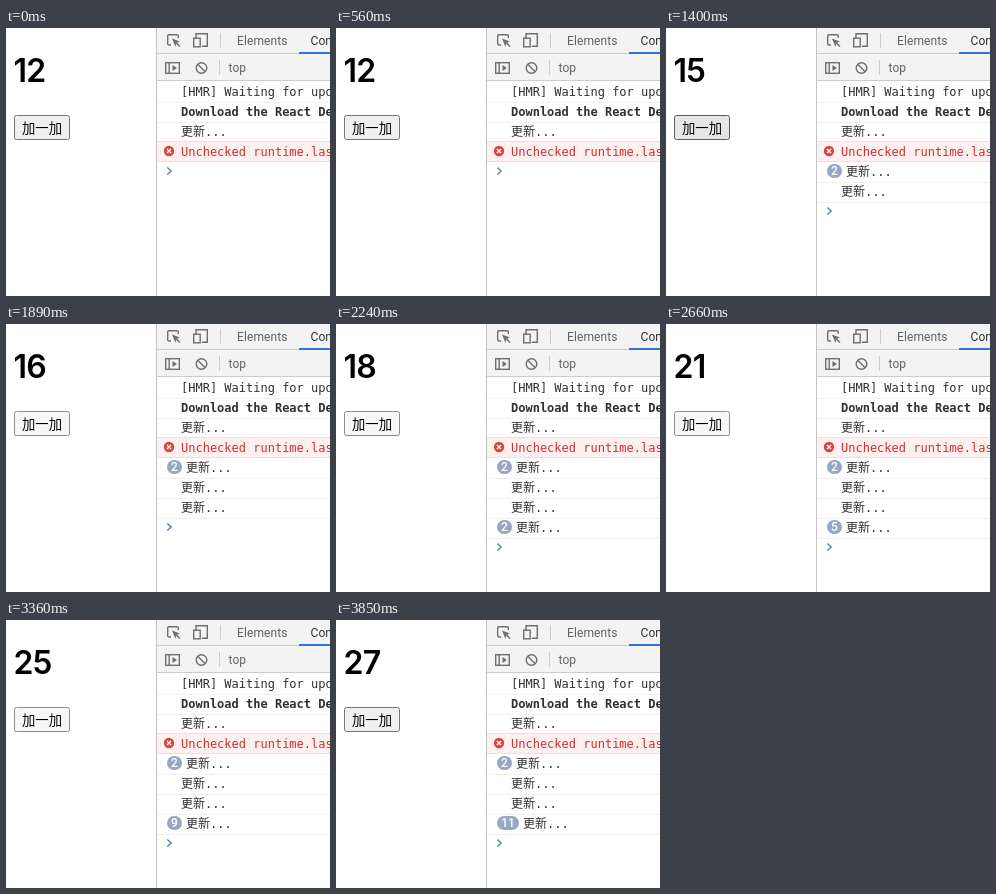
An HTML page for the animation above (4130 ms loop, 324 by 268 pixels).

```html
<!DOCTYPE html>
<html lang="zh-CN">
<head>
<meta charset="utf-8">
<title>Counter and console</title>
<style>
html, body { margin: 0; width: 100%; height: 100%; overflow: hidden; background: #fff; }
svg { display: block; width: 324px; height: 268px; }
.num { font: 600 32px Inter, sans-serif; letter-spacing: -.7px; }
.btn { font: 13.333px "Noto Sans CJK SC", "Noto Sans CJK", sans-serif; text-anchor: middle; }
.ui { font: 12px Roboto, "Liberation Sans", sans-serif; letter-spacing: .1px; fill: #5f6368; }
.log { font: 12px "DejaVu Sans Mono", "Noto Sans CJK SC", "Noto Sans CJK", monospace; fill: #303030; white-space: pre; }
.bold { font-weight: 700; }
.badge { font: 500 12px Roboto, "Liberation Sans", sans-serif; fill: #fff; text-anchor: middle; }
.icon { fill: none; stroke: #6e6e6e; stroke-width: 1.4; }
</style>
</head>
<body>
<svg viewBox="0 0 324 268">
  <rect width="324" height="268" fill="#fff"/>
  <text id="num" class="num" x="7.5" y="54"></text>
  <rect id="btn" x="8.5" y="87.5" width="55" height="24" rx="2"/>
  <text class="btn" x="36" y="104.5">加一加</text>

  <rect x="151" width="173" height="52" fill="#f3f3f3"/>
  <path d="M151 25.5H324M151 52.5H324M214.5 5V20M213.5 32V47" stroke="#cccccc" fill="none"/>
  <path d="M150.5 0V268" stroke="#c4c4c4"/>
  <rect x="293" y="24" width="31" height="2" fill="#2f74de"/>
  <g class="icon">
    <path d="M165 17H163Q161.7 17 161.7 15.700V8Q161.700 6.700 163 6.700H171Q172.300 6.700 172.300 8V10"/>
    <path d="M166 10.500L174 13.500L170.800 14.800L169.300 18.500Z" fill="#6e6e6e" stroke="none"/>
    <path d="M170.500 15L174 18.500"/>
    <path d="M190 10V5.700H201.300V18.300H196"/>
    <rect x="187.700" y="10.200" width="6.500" height="8.600" fill="#f3f3f3"/>
    <rect x="159.700" y="34.700" width="13.600" height="10.600"/>
    <path d="M163.200 34.700V45.300"/>
    <path d="M166.500 37L171 40L166.500 43Z" fill="#6e6e6e" stroke="none"/>
    <circle cx="195.500" cy="40" r="5.300"/>
    <path d="M191.800 36.300L199.200 43.700"/>
  </g>
  <text class="ui" x="231" y="16.500">Elements</text>
  <text class="ui" x="304.500" y="16.500" style="fill:#333">Console</text>
  <text class="ui" x="222.500" y="44">top</text>

  <rect x="151" y="114" width="173" height="20" fill="#fff0f0"/>
  <path d="M151 74.500H324M151 94.500H324" stroke="#f0f0f0"/>
  <path d="M151 113.500H324M151 133.500H324" stroke="#fbd9d9"/>
  <text class="log" x="175" y="68">[HMR] Waiting for update signal</text>
  <text class="log bold" x="175" y="88">Download the React DevTools</text>
  <text class="log" x="175" y="108">更新...</text>
  <text class="log" x="175" y="128" style="fill:#c93030">Unchecked runtime.lastError</text>
  <circle cx="163" cy="123" r="5.200" fill="#d8473f"/>
  <path d="M161 121L165 125M165 121L161 125" stroke="#fff" stroke-width="1.300"/>
  <g id="rows"></g>
  <path id="prompt" d="M161.300 -3.500L165.200 0L161.300 3.500" fill="none" stroke-width="1.400"/>
</svg>
<script>
const LOOP = 4130, STEP = 70;
const $ = id => document.getElementById(id);
const looks = {
  rest: ['#f0f0f0', '#767676'],
  hover: ['#e6e6e6', '#5c5c5c'],
  down: ['#f7f7f7', '#8d8d8d']
};

// [time, button look, counter]
const events = [
  [0, 'rest', 12], [910, 'down', 13], [980, 'hover', 14],
  [1260, 'down', 14], [1330, 'down', 15], [1400, 'hover', 15],
  [1610, 'down', 15], [1680, 'down', 16], [1750, 'hover', 16],
  [1890, 'down', 16], [1960, 'hover', 17], [2030, 'down', 17]
];

// Rapid clicking: release counts up, the next press follows one step later.
function burst(start, clicks, from) {
  for (let i = 0; i < clicks; i++) {
    const t = start + i * 2 * STEP;
    events.push([t, 'hover', from + i], [t + STEP, 'down', from + i]);
  }
}
burst(2170, 4, 18);
burst(2800, 4, 22);
burst(3500, 1, 26);
events.push([3640, 'hover', 27], [3850, 'rest', 27]);

// Repeat count of each console row below the error
function rowsFor(n) {
  const rows = [];
  if (n > 12) rows.push(Math.min(n - 12, 2));
  if (n > 14) rows.push(1);
  if (n > 15) rows.push(1);
  if (n > 16) rows.push(n - 16);
  return rows;
}

function rowMarkup(times, i) {
  const y = 143 + i * 20;
  const w = times > 9 ? 22 : 15;
  const x = times > 1 ? 165 + w : 175;
  const badge = times > 1
    ? `<rect x="161" y="${y - 7}" width="${w}" height="14" rx="7" fill="#97a7c4"/>
       <text class="badge" x="${161 + w / 2}" y="${y + 4.3}">${times}</text>`
    : '';
  return `${badge}<text class="log" x="${x}" y="${y + 5}">更新...</text>
    <path d="M151 ${y + 11.5}H324" stroke="#f0f0f0"/>`;
}

let shown = null;
function draw(t) {
  const now = events.filter(e => e[0] <= t).pop();
  if (now === shown) return;
  shown = now;
  const [, look, n] = now;
  const rows = rowsFor(n);
  $('num').textContent = n;
  $('btn').setAttribute('fill', looks[look][0]);
  $('btn').setAttribute('stroke', looks[look][1]);
  $('rows').innerHTML = rows.map(rowMarkup).join('');
  $('prompt').setAttribute('transform', `translate(0 ${143 + rows.length * 20})`);
  $('prompt').setAttribute('stroke', rows.length ? '#5480bd' : '#6f8196');
}

function tick() {
  draw(performance.now() % LOOP);
  requestAnimationFrame(tick);
}
tick();
</script>
</body>
</html>
```
